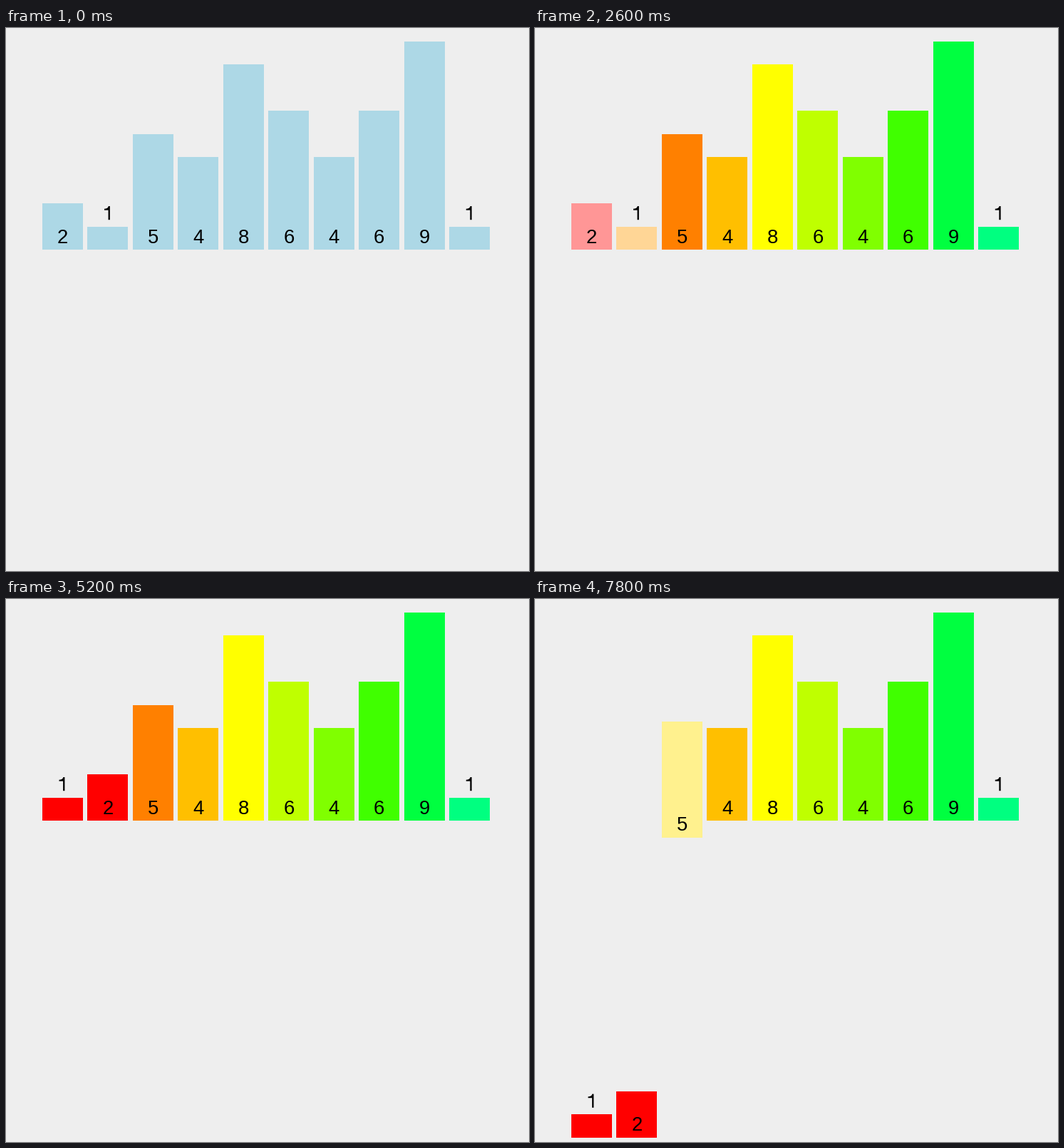
Animation of 734 by 762 pixels, one loop 8 s. Source, as a matplotlib script:

```python
import colorsys

import numpy as np
import matplotlib.pyplot as plt
from matplotlib.animation import FuncAnimation
from matplotlib.patches import Polygon, Rectangle

W, H, DPI = 734, 762, 64
STEP, LOOP = 200, 8000
VALUES = [2, 1, 5, 4, 8, 6, 4, 6, 9, 1]
LEFT, PITCH, BAR_W, UNIT = 51, 63.47, 57, 32.45
FLOOR, DROP = 311, 444.6
MOVE_MS = 260

BLUE = np.array([173, 216, 230]) / 255
RED = np.array([1.0, 0, 0])


def hue_color(i):
    """Rainbow in 15 degree steps, leaving out pure green."""
    return np.array(colorsys.hsv_to_rgb(15 * (i + (i > 7)) / 360, 1, 1))


def pale(color):
    return np.minimum(color + 150 / 255, 1)


# Ease curve, cubic-bezier(.25, .1, .25, 1)
u = np.linspace(0, 1, 400)
EASE_X = 0.75 * u * (1 - u) ** 2 + 0.75 * u**2 * (1 - u) + u**3
EASE_Y = 0.3 * u * (1 - u) ** 2 + 3 * u**2 * (1 - u) + u**3


def ease(x):
    return np.interp(x, EASE_X, EASE_Y)


def tint(*bars):
    """Highlight bars; the third one still has its own hue."""
    return {b: {"color": c} for b, c in bars}


def place(bar, slot, row):
    return {bar: {"slot": slot, "row": row, "color": RED}}


# Merge sort steps: start time and the properties that change
EVENTS = [
    (1470, {i: {"color": hue_color(i)} for i in range(10)}),
    (2330, tint((0, pale(RED)), (1, pale(hue_color(1))))),
    (2930, place(1, 0, 1)),
    (3583, place(0, 1, 1)),
    (4330, place(1, 0, 0)),
    (4930, place(0, 1, 0)),
    (5730, tint((1, pale(RED)), (0, pale(RED)), (2, pale(hue_color(2))))),
    (6330, place(1, 0, 1)),
    (6983, place(0, 1, 1)),
    (7782, place(2, 2, 1)),
]


def state_at(t):
    bars = [{"slot": i, "row": 0, "color": BLUE} for i in range(10)]
    for start, changes in EVENTS:
        if t <= start:
            break
        k = ease(min((t - start) / MOVE_MS, 1))
        for i, props in changes.items():
            for name, goal in props.items():
                bars[i][name] = bars[i][name] + (goal - bars[i][name]) * k
    return bars


fig = plt.figure(figsize=(W / DPI, H / DPI), dpi=DPI, facecolor="#eeeeee")
ax = fig.add_axes([0, 0, 1, 1])
ax.set(xlim=(0, W), ylim=(H, 0))
ax.axis("off")

# Plain footless "1", relative to the label's baseline centre
ONE = np.array([(0.6, 0), (0.6, -13.6), (-5, -13.6), (-5, -15.4), (-2.2, -15.9),
                (-0.2, -17), (0.9, -19.2), (2.9, -19.2), (2.9, 0)])

rects, labels = [], []
for v in VALUES:
    rects.append(ax.add_patch(Rectangle((0, 0), BAR_W, v * UNIT, lw=0)))
    if v == 1:
        label = ax.add_patch(Polygon(ONE, color="black", lw=0, zorder=3))
    else:
        label = ax.text(0, 0, str(v), family="Liberation Sans", zorder=3,
                        size=27.5 * 72 / DPI, ha="center", va="baseline")
    labels.append(label)


def draw(n):
    for v, bar, rect, label in zip(VALUES, state_at(n * STEP), rects, labels):
        x = LEFT + PITCH * bar["slot"]
        floor = FLOOR + DROP * bar["row"]
        rect.set_xy((x, floor - v * UNIT))
        rect.set_facecolor(np.clip(bar["color"], 0, 1))
        mid = x + BAR_W / 2
        if v == 1:
            label.set_xy(ONE + (mid, floor - 41.8))
        else:
            label.set_position((mid, floor - 9.5))
    return rects + labels


anim = FuncAnimation(fig, draw, frames=LOOP // STEP, interval=STEP,
                     repeat=True, repeat_delay=0)
plt.show()
```
